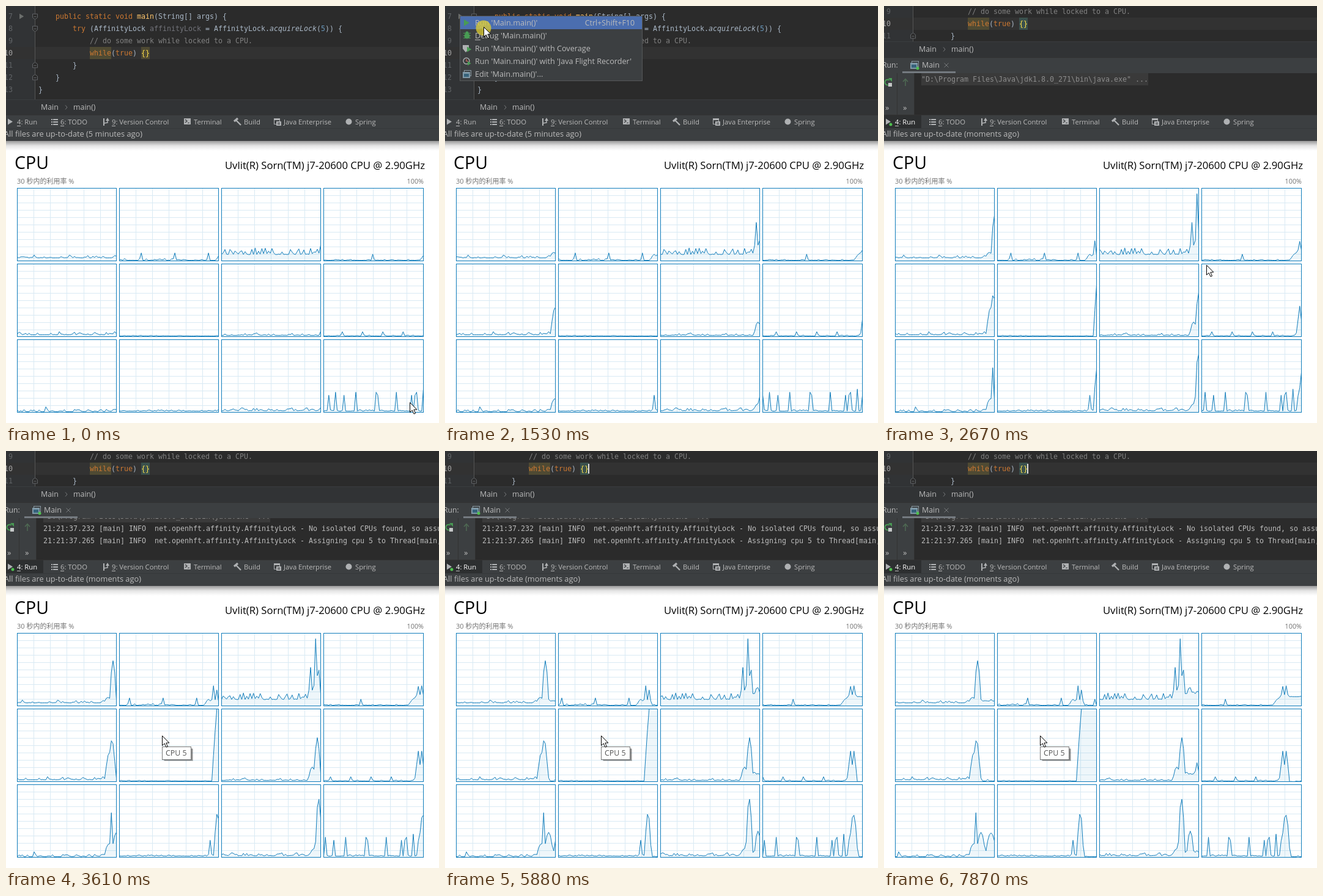
These frames come from a looping animation (708 px wide and 683 px high, 7.99 s). An HTML page with a canvas:

```html
<!DOCTYPE html>
<html lang="zh">
<head>
<meta charset="utf-8">
<title>CPU affinity</title>
<style>
  html, body { margin: 0; width: 708px; height: 683px; overflow: hidden; background: #fff; }
  canvas { display: block; }
</style>
</head>
<body>
<canvas id="stage" width="708" height="683"></canvas>
<script>
const ctx = document.getElementById('stage').getContext('2d');
const LOOP = 7990, MENU_OPEN = 1190, MENU_CLOSE = 1640, RUN_OPEN = 1740, LOG_AT = 2700, TIP_AT = 3240;
const MONO = '11.63px "DejaVu Sans Mono", monospace';
const ui = size => `${size}px "Open Sans", "Noto Sans CJK SC", "Noto Sans CJK", sans-serif`;
const KEY = '#cc7832', PLAIN = '#a9b7c6', DIM = '#808080', LABEL = '#bbbbbb', ICON = '#afb1b3', GREEN = '#499c54';
const BLUE = '#117dbb', GRID = '#d9eaf4';

// ---------- drawing helpers ----------
function rect(x, y, w, h, color) { ctx.fillStyle = color; ctx.fillRect(x, y, w, h); }
function frame(x, y, w, h, color) { ctx.lineWidth = 1; ctx.strokeStyle = color; ctx.strokeRect(x, y, w, h); }
function disc(x, y, r, color) { ctx.fillStyle = color; ctx.beginPath(); ctx.arc(x, y, r, 0, 7); ctx.fill(); }
function trace(points) {
  ctx.beginPath();
  points.forEach(([x, y]) => ctx.lineTo(x, y));
}
function poly(points, color) { trace(points); ctx.closePath(); ctx.fillStyle = color; ctx.fill(); }
function line(points, color, width = 1) { trace(points); ctx.lineWidth = width; ctx.strokeStyle = color; ctx.stroke(); }
function text(str, x, y, color, font, align = 'left') {
  ctx.font = font; ctx.fillStyle = color; ctx.textAlign = align;
  ctx.fillText(str, x, y);
}
function clip(x, y, w, h, draw) {
  ctx.save(); ctx.beginPath(); ctx.rect(x, y, w, h); ctx.clip(); draw(); ctx.restore();
}
const play = (x, y, s, color) => poly([[x, y - s], [x + s * 1.6, y], [x, y + s]], color);

// ---------- editor ----------
const codeLines = [
  [7, 4, ['public static void ', KEY], ['main', '#ffc66d'], ['(String[] args) {', PLAIN]],
  [8, 8, ['try ', KEY], ['(AffinityLock ', PLAIN], ['affinityLock', '#72737a'], [' = AffinityLock.', PLAIN],
    ['acquireLock', PLAIN, 'italic '], ['(', PLAIN], ['5', '#6897bb'], [')) {', PLAIN]],
  [9, 12, ['// do some work while locked to a CPU.', DIM]],
  [10, 12, ['while', KEY], ['(', PLAIN], ['true', KEY], [') ', PLAIN], ['{}', '#ffe04a']],
  [11, 8, ['}', PLAIN]],
  [12, 4, ['}', PLAIN]],
  [13, 0, ['}', PLAIN]],
];

function drawFoldMark(y, d) {
  const mark = [[43.5, y - 4 * d], [51.5, y - 4 * d], [51.5, y + 2 * d], [47.5, y + 5 * d], [43.5, y + 2 * d], [43.5, y - 4 * d]];
  poly(mark, '#2b2b2b');
  line(mark, '#606366');
  line([[45.5, y + .5], [49.5, y + .5]], '#606366');
}

function drawEditor(t, running) {
  const bottom = running ? 58 : 153;
  rect(0, 0, 708, bottom, '#2b2b2b');
  clip(0, 0, 708, bottom, () => {
    if (running) ctx.translate(0, -48);
    rect(0, 0, 47, 210, '#313335');
    rect(0, 67, 708, 20, '#323232');
    rect(47, 0, 1, 210, '#555555');
    rect(137, 67, 35, 20, '#4f4a33');
    rect(221, 67, 14, 20, running ? '#3b514d' : '#4f4a33');
    play(22, 17, 4.5, '#6b6e6c');
    for (const [number, indent, ...parts] of codeLines) {
      const y = number * 20 - 123;
      text(number, 11, y + 4, number === 10 ? '#a4a3a3' : '#606366', MONO, 'right');
      if (indent === 4 || indent === 8) drawFoldMark(y, number < 9 ? 1 : -1);
      let x = 53 + indent * 7;
      for (const [str, color, style = ''] of parts) {
        text(str, x, y + 4, color, style + MONO);
        x += str.length * 7;
      }
    }
    if (running && (t + 130) % 1000 < 500) rect(234, 69, 2, 16, '#dddddd');
  });
  rect(0, bottom, 708, 26, '#313335');
  rect(0, bottom, 708, 1, '#3a3d3f');
  text('Main', 57, bottom + 17, LABEL, ui(12.4));
  line([[97, bottom + 9.5], [100, bottom + 13], [97, bottom + 16.5]], '#77797b');
  text('main()', 110, bottom + 17, LABEL, ui(12.4));
}

function windowIcon(x, y) {
  frame(x + 2.5, y + .5, 11, 9, '#8b9aa3');
  rect(x, y + 3, 12, 10, '#7f99a8');
  rect(x + 2, y + 6, 8, 5, '#36627a');
}

function drawRunPanel(t) {
  rect(0, 84, 708, 26, '#3c3f41');
  rect(0, 84, 708, 1, '#323232');
  text('Run:', -3, 101, LABEL, ui(12.2));
  windowIcon(43, 90);
  disc(55, 102, 2.5, '#4fc04f');
  text('Main', 62, 101, LABEL, ui(12.4));
  line([[98.5, 93.5], [105.5, 100.5]], '#777a7c');
  line([[105.5, 93.5], [98.5, 100.5]], '#777a7c');
  rect(30, 107, 87, 3, '#747a80');
  rect(0, 110, 708, 68, '#2b2b2b');
  rect(0, 110, 50, 68, '#3c3f41');
  rect(21, 110, 1, 68, '#323232');
  rect(49, 110, 1, 68, '#323232');
  ctx.beginPath(); ctx.arc(6, 125, 4.5, 1, 5.4);
  ctx.strokeStyle = GREEN; ctx.lineWidth = 2; ctx.stroke();
  poly([[7, 118], [13, 118], [13, 124]], GREEN);
  rect(7, 126, 6, 6, '#c5c7c8');
  line([[35, 131], [35, 120]], '#4f6b54', 1.5);
  line([[31, 124], [35, 119.5], [39, 124]], '#4f6b54', 1.5);
  text('»', 2, 171, LABEL, ui(13));
  text('»', 31, 171, LABEL, ui(13));
  clip(50, 110, 658, 67, () => {
    const logged = t >= LOG_AT, y = logged ? 107 : 120;
    rect(61, y - 10, 371, 20, '#3a3a3a');
    text('"D:\\Program Files\\Java\\jdk1.8.0_271\\bin\\java.exe" ...', 61, y + 4, '#8c8c8c', MONO);
    if (!logged) return;
    const prefix = '[main] INFO  net.openhft.affinity.AffinityLock - ';
    text('21:21:37.232 ' + prefix + 'No isolated CPUs found, so assuming', 61, 131, LABEL, MONO);
    text('21:21:37.265 ' + prefix + 'Assigning cpu 5 to Thread[main,5,main]', 61, 151, LABEL, MONO);
  });
}

const toolButtons = [['4: Run', 18], ['6: TODO', 89], ['9: Version Control', 173], ['Terminal', 307],
  ['Build', 389], ['Java Enterprise', 454], ['Spring', 571]];

function drawToolbars(running) {
  rect(0, 178, 708, 43, '#3c3f41');
  rect(0, 178, 708, 1, '#323232');
  if (running) rect(0, 179, 61, 21, '#2d2f30');
  rect(0, 200, 708, 1, '#35383a');
  for (const [label, x] of toolButtons) {
    text(label, x, 194, running && label === '4: Run' ? '#ffffff' : LABEL, ui(11.25));
    if (label[1] === ':') rect(x, 196, 6, 1, LABEL);
  }
  play(3, 189.5, 5, ICON);
  if (running) disc(11, 194, 2.5, '#4fc04f');
  for (let y = 185; y < 197; y += 4) { rect(74, y, 2, 2, ICON); rect(77, y, 8, 2, ICON); }
  line([[160, 184], [160, 196]], ICON, 2);
  line([[160, 192], [166, 191], [166, 186]], ICON, 1.5);
  poly([[163, 188], [166, 183], [169, 188]], ICON);
  rect(291, 184, 11, 10, ICON);
  line([[293, 186], [296, 188.5], [293, 191]], '#3c3f41', 1.3);
  rect(297, 191, 3, 1, '#3c3f41');
  line([[376, 187], [384, 195]], ICON, 2.3);
  line([[373, 189], [379, 184]], ICON, 3.5);
  frame(438.5, 184.5, 9, 9, ICON);
  rect(438, 184, 10, 3, ICON);
  rect(442, 189, 8, 7, ICON);
  rect(444, 191, 4, 1, '#3c3f41');
  rect(444, 193, 4, 1, '#3c3f41');
  disc(560.5, 189.5, 5, ICON);
  text(`All files are up-to-date (${running ? 'moments' : '5 minutes'} ago)`, -3, 214, LABEL, ui(12.8));
}

const menuItems = ["Run 'Main.main()'", "Debug 'Main.main()'", "Run 'Main.main()' with Coverage",
  "Run 'Main.main()' with 'Java Flight Recorder'", "Edit 'Main.main()'..."];

function drawMenu() {
  rect(24, 16, 299, 107, '#3c3f41');
  rect(25, 17, 297, 21, '#4b6eaf');
  frame(24.5, 16.5, 298, 106, '#565859');
  menuItems.forEach((item, i) => text(item, 49, 32 + i * 21, LABEL, ui(12.65)));
  text('Ctrl+Shift+F10', 310, 32, LABEL, ui(12.4), 'right');
  rect(57, 34, 7, 1, LABEL);
  rect(49, 55, 9, 1, LABEL);
  play(31, 27.5, 5.5, GREEN);
  for (let y = 44.5; y < 54; y += 4) line([[30, y], [42, y]], GREEN);
  disc(36, 49, 4.5, GREEN);
  disc(36, 44, 2.5, GREEN);
  poly([[29, 64], [39, 64], [39, 70], [34, 76], [29, 70]], ICON);
  play(36, 71, 4.5, GREEN);
  ctx.beginPath(); ctx.arc(35, 90, 5, 0, 7); ctx.lineWidth = 1.3; ctx.strokeStyle = ICON; ctx.stroke();
  line([[35, 87], [35, 90], [38, 91]], '#d5675d', 1.3);
  play(37, 94, 3.5, GREEN);
  windowIcon(29, 105);
}

// ---------- CPU charts ----------
const SHOWN = 60, TOTAL = 75, BURST_END = 66, FULL = 119;
const charts = [];

function random(n, id) {
  const wave = Math.sin(n * 12.9898 + id * 78.233 + 1) * 43758.5453;
  return wave - Math.floor(wave);
}
// A rounded bump of load around one sample.
const pulse = (at, height, width = 1) => n => height * (1 - ((n - at) / width) ** 2);
// Evenly spaced spikes while the machine is idle.
const every = (step, offset, height) => n => n < BURST_END - 8 && n % step === offset ? height : 0;

function addChart(idle, spread, after, ...loads) {
  const id = charts.length;
  charts.push(Array.from({ length: TOTAL }, (_, n) => {
    const noise = (n < BURST_END ? idle : after) + spread * random(n, id) ** 3;
    return Math.min(FULL, Math.max(noise, ...loads.map(load => load(n))));
  }));
}
addChart(5, 5, 8, pulse(61, 14, 3), pulse(64, 74, 2));
addChart(1, 3, 1, every(20, 13, 13), pulse(60, 11, 2), pulse(63, 33, 1.2), pulse(65, 26, 1.2), pulse(73, 11));
addChart(10.5, 11, 20, pulse(60, 63, 1.3), pulse(63, 110, 1.2), pulse(64.6, 66, 1.2));
addChart(1, 1.5, 15, pulse(29, 11), pulse(62, 14, 5), pulse(63, 32, 1.5), pulse(65, 33, 1.5));
addChart(3, 6, 1, pulse(61.3, 44, 2), pulse(63.3, 68, 2.4));
addChart(1, 1, 1, pulse(80, 400, 18));
addChart(2, 4, 12, pulse(61, 24, 2.5), pulse(64, 72, 2), pulse(73, 31, 1.5));
addChart(1, 1.5, 0, every(12, 11, 8), pulse(62, 8, 2), pulse(63, 50, 1.5), pulse(65, 50, 1.5));
addChart(1, 4, 5, pulse(17, 9), pulse(61, 21, 2), pulse(63, 73, 1.2), pulse(66, 41, 2.8), pulse(72, 40, 3.5));
addChart(2, 2, 1, pulse(60, 28, 1.1), pulse(64.3, 72, 2));
addChart(2.5, 5, 8, pulse(61, 14, 3), pulse(63.8, 96, 2.1), pulse(69, 43, 2.3));
addChart(2, 2, 1, every(12, 7, 33), every(49, 3, 28), every(20, 12, 28), pulse(54, 28), pulse(59, 38),
  pulse(62, 27), pulse(64.7, 70, 2.6));

// Two samples a second, with a pause while the program starts; the charts refresh one after another.
function samplesTaken(t, id) {
  const early = Math.min(3, Math.floor((t + 400) / 490));
  return early + Math.max(0, Math.floor((t - 1629 - id * 2.2) / 491));
}

function drawChart(values, id, t) {
  const col = id % 4, x = 18 + col * 167, y = 298 + Math.floor(id / 4) * 124, w = col === 3 ? 163 : 162;
  for (let i = 1; i < 6; i++) rect(x + Math.round(i * 27.15), y, 1, FULL, GRID);
  for (let i = 1; i < 10; i++) rect(x, y + i * 12, w, 1, GRID);
  clip(x, y, w + 1, FULL + 1, () => {
    const first = samplesTaken(t, id), base = y + FULL + .5;
    const points = values.slice(first, first + SHOWN).map((v, i) => [x + .5 + i * w / (SHOWN - 1), base - v]);
    poly([[x, base], ...points, [x + w, base]], 'rgba(17,125,187,.07)');
    line(points, BLUE);
  });
  frame(x + .5, y + .5, w, FULL, BLUE);
}

function drawMonitor(t) {
  rect(0, 221, 708, 462, '#ffffff');
  const shade = ctx.createLinearGradient(0, 221, 0, 237);
  shade.addColorStop(0, 'rgba(0,0,0,.4)');
  shade.addColorStop(.5, 'rgba(0,0,0,.1)');
  shade.addColorStop(1, 'rgba(0,0,0,0)');
  rect(0, 221, 708, 16, shade);
  text('CPU', 14, 267, '#000000', ui(28.5));
  text('Uvlit(R) Sorn(TM) j7-20600 CPU @ 2.90GHz', 685, 267, '#000000', ui(16.7), 'right');
  text('30 秒内的利用率 %', 18, 291, '#707070', ui(11));
  text('100%', 683, 291, '#707070', ui(10.8), 'right');
  charts.forEach((values, id) => drawChart(values, id, t));
  if (t >= TIP_AT) {
    rect(259, 488, 47, 20, 'rgba(0,0,0,.2)');
    rect(258, 487, 47, 20, 'rgba(0,0,0,.3)');
    rect(255, 484, 48, 22, '#ffffff');
    frame(255.5, 484.5, 47, 21, '#767676');
    text('CPU 5', 261, 499, '#575757', ui(12.4));
  }
}

// ---------- pointer ----------
const arrow = [[0, 0], [0, 16], [3.7, 12.6], [6.5, 18.7], [9, 17.6], [6.3, 11.7], [11.3, 11.5]];
const moves = [
  { from: 20, to: 1060, x: 24, y: 17 },
  { from: 1290, to: 1500, x: 63, y: 34 },
  { from: 1640, to: 2040, x: 654, y: 404 },
  { from: 2340, to: 3220, x: 255, y: 466 },
];

function pointerAt(t) {
  let x = 660, y = 649;
  for (const move of moves) {
    const p = Math.min(1, Math.max(0, (t - move.from) / (move.to - move.from)));
    const eased = p * p * (3 - 2 * p);
    x += (move.x - x) * eased;
    y += (move.y - y) * eased;
  }
  return [Math.round(x), Math.round(y)];
}

function drawPointer(t) {
  const [x, y] = pointerAt(t);
  const pressed = (t >= 1130 && t < 1230) || (t >= 1510 && t < 1620);
  if (pressed) disc(x, y + 2, 12.5, 'rgba(222,205,50,.75)');
  const shape = arrow.map(([dx, dy]) => [x + .5 + dx, y + .5 + dy]);
  poly(shape, '#ffffff');
  line([...shape, shape[0]], '#000000');
}

function draw() {
  const t = performance.now() % LOOP, running = t >= RUN_OPEN;
  drawMonitor(t);
  drawEditor(t, running);
  if (running) drawRunPanel(t);
  drawToolbars(running);
  if (t >= MENU_OPEN && t < MENU_CLOSE) drawMenu();
  drawPointer(t);
  requestAnimationFrame(draw);
}
draw();
</script>
</body>
</html>
```
